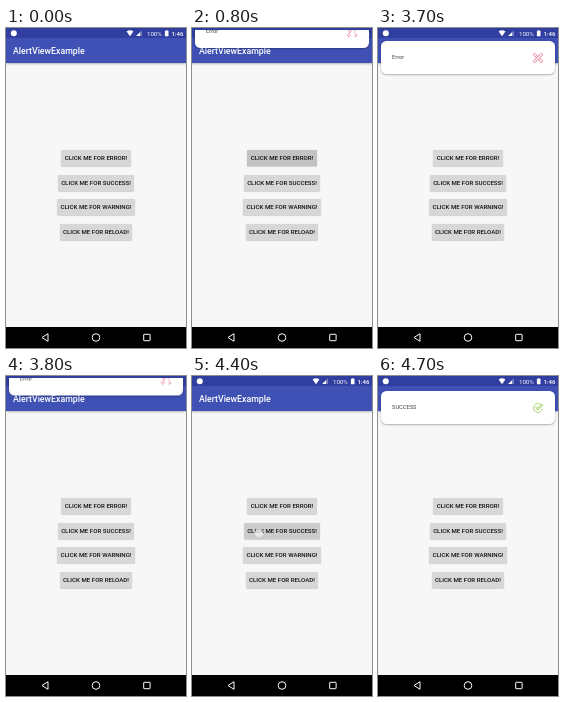
These frames come from a looping animation (180 px wide and 320 px high, 5100 ms). An HTML page:

```html
<!DOCTYPE html>
<html lang="en">
<head>
<meta charset="utf-8">
<title>Alert view</title>
<style>
  html, body { margin: 0; width: 100%; height: 100%; overflow: hidden; }
  body {
    position: relative; background: #f7f7f8; color: #111;
    font: 500 6.125px/1 Roboto, sans-serif;
  }
  body * { box-sizing: border-box; }
  .bar, .title, .nav, .alerts, .card, .icons, .touch { position: absolute; }
  .bar {
    left: 0; top: 0; width: 180px; height: 35px;
    background: linear-gradient(#303f9f 10.5px, #3f51b5 10.5px);
    box-shadow: 0 1px 2px rgba(0, 0, 0, .28);
  }
  .title { left: 7px; top: 18.5px; font-size: 8.75px; color: #fff; white-space: nowrap; }
  .icons { left: 0; top: 0; }
  .nav { left: 0; top: 299px; background: #000; }

  .buttons {
    position: absolute; left: 0; top: 118px; width: 180px;
    display: flex; flex-direction: column; align-items: center;
  }
  .button {
    position: relative; height: 15.75px; margin: 4.375px 0; padding: 0 3.5px;
    line-height: 16px; white-space: nowrap;
    background: #d6d7d7; border-radius: 1px;
    box-shadow: 0 .5px 1px rgba(0, 0, 0, .28);
  }
  .touch {
    width: 8px; height: 8px; border-radius: 50%;
    background: rgba(240, 240, 240, .75); opacity: 0;
  }

  /* the alerts never cover the two topmost rows */
  .alerts { left: 0; top: 2px; width: 180px; height: 70px; overflow: hidden; }
  .card {
    left: 3px; top: 13px; width: 174px; height: 33px; padding-left: 11px;
    font-size: 5.7px; font-weight: 400; line-height: 33px; color: #444;
    background: #fff; border-radius: 5.5px;
    box-shadow: 0 .8px 2px rgba(0, 0, 0, .35);
    transform: translateY(-56px);
  }
  .card svg { position: absolute; left: 151px; top: 11px; }

  /* 5100 ms loop, moving in 100 ms steps */
  .press1, .press2, .touch, .card { animation: 5.1s step-end infinite; }
  .press1 { animation-name: press1; }
  .press2 { animation-name: press2; }
  .press1 .touch { left: 36px; top: 2px; animation-name: touch1; }
  .press2 .touch { left: 11px; top: 6px; animation-name: touch2; }
  .error { animation-name: error; }
  .success { animation-name: success; }

  @keyframes press1 {
    0% { background: #d6d7d7; }
    11.76% { background: #d1d2d2; }
    13.72% { background: #c8c9c9; }
    15.68% { background: #c1c2c2; }
    17.64% { background: #cbcccc; }
    19.6% { background: #d2d3d3; }
    21.56%, 100% { background: #d6d7d7; }
  }
  @keyframes press2 {
    0% { background: #d6d7d7; }
    84.31% { background: #d1d2d2; }
    86.27% { background: #cbcccc; }
    88.23% { background: #c1c2c2; }
    90.19% { background: #cbcccc; }
    92.15%, 100% { background: #d6d7d7; }
  }
  @keyframes touch1 {
    0% { opacity: 0; }
    11.76% { opacity: 1; }
    13.72% { opacity: .8; }
    15.68%, 100% { opacity: 0; }
  }
  @keyframes touch2 {
    0% { opacity: 0; }
    84.31% { opacity: 1; }
    88.23%, 100% { opacity: 0; }
  }
  @keyframes error {
    0% { transform: translateY(-56px); }
    15.68% { transform: translateY(-28px); }
    17.64% { transform: translateY(-8px); }
    19.6% { transform: translateY(-1px); }
    21.56% { transform: none; }
    72.54% { transform: translateY(-2px); }
    74.5% { transform: translateY(-28.5px); }
    76.47%, 100% { transform: translateY(-56px); }
  }
  @keyframes success {
    0% { transform: translateY(-56px); }
    88.23% { transform: translateY(-28px); }
    90.19% { transform: translateY(-8px); }
    92.15%, 100% { transform: none; }
  }
</style>
</head>
<body>
  <div class="bar"></div>
  <div class="title">AlertViewExample</div>

  <div class="buttons">
    <div class="button press1"><i class="touch"></i>CLICK ME FOR ERROR!</div>
    <div class="button press2"><i class="touch"></i>CLICK ME FOR SUCCESS!</div>
    <div class="button">CLICK ME FOR WARNING!</div>
    <div class="button">CLICK ME FOR RELOAD!</div>
  </div>

  <div class="alerts">
    <div class="card error">Error
      <svg width="12" height="12" viewBox="-6 -6 12 12" fill="#fff" stroke="#e0486c" stroke-width=".7">
        <g transform="rotate(45)">
          <rect x="-5.8" y="-1.1" width="11.6" height="2.2" rx=".7"/>
          <rect x="-1.1" y="-5.8" width="2.2" height="11.6" rx=".7"/>
        </g>
      </svg>
    </div>
    <div class="card success">SUCCESS
      <svg width="12" height="12" viewBox="-6 -6 12 12" fill="none" stroke="#8cc63f" stroke-width=".7" stroke-linejoin="round">
        <path d="M3.2-3.2A4.5 4.5 0 1 0 4.4 .9"/>
        <path d="M-2.6-.3L-1.6-1.3L-.2 .1L3.8-3.7L4.9-2.6L-.2 2.3Z" fill="#e4f3cf"/>
      </svg>
    </div>
  </div>

  <svg class="icons" width="180" height="11" fill="#fff">
    <circle cx="7.8" cy="5.3" r="3"/>
    <path d="M120.6 3.6Q124 1 127.4 3.6L124 8.2Z"/>
    <path d="M130.2 8L136 2.2V8Z" fill-opacity=".35"/>
    <path d="M130.2 8L134 4.2V8Z"/>
    <path d="M158.9 2.8H160V2.2H161.4V2.8H162.5V8.2H158.9Z"/>
    <text x="141" y="7.6" font-weight="400">100%</text>
    <text x="165.4" y="7.6">1:46</text>
  </svg>

  <svg class="nav" width="180" height="21" fill="none" stroke="#fff" stroke-width="1" stroke-linejoin="round">
    <path d="M42 6.7V14.3L36 10.5Z"/>
    <circle cx="90" cy="10.5" r="3.8"/>
    <rect x="137.7" y="7.3" width="6.4" height="6.4" rx=".4"/>
  </svg>
</body>
</html>
```
